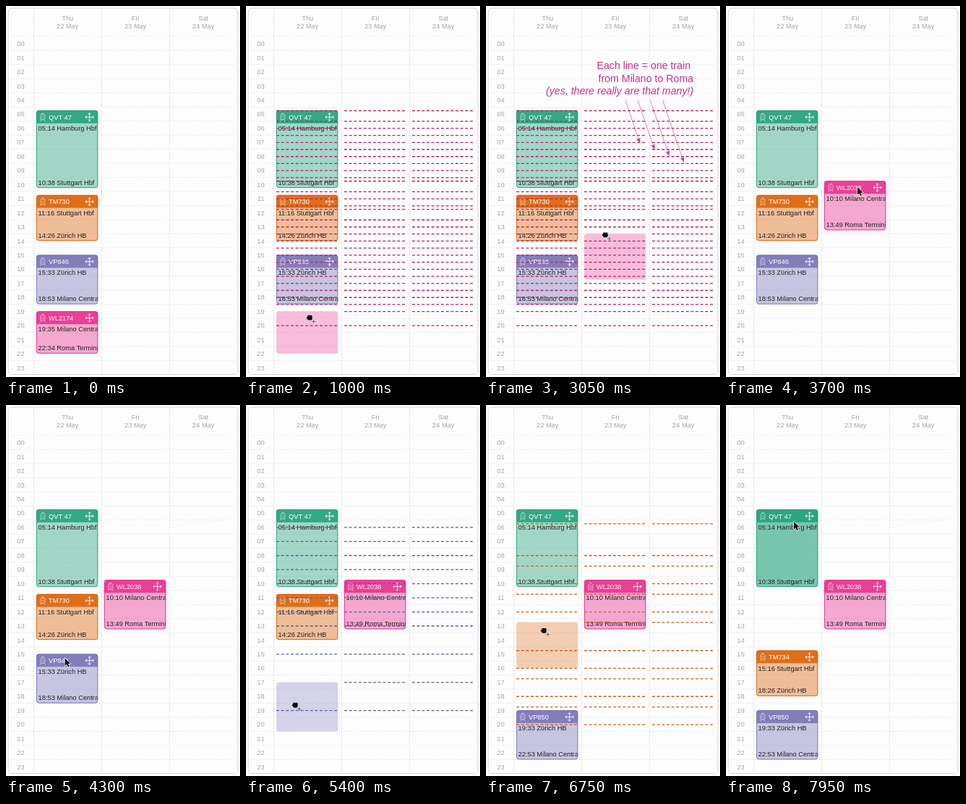
These frames come from a looping animation (324x512 px, 8000 ms). An HTML page with a canvas:

```html
<!DOCTYPE html>
<html lang="en">
<head>
<meta charset="utf-8">
<title>Train timetable planner</title>
<style>
html, body { margin: 0; width: 100%; height: 100%; overflow: hidden; background: #fff; }
canvas { display: block; width: 324px; height: 512px; }
</style>
</head>
<body>
<canvas id="stage"></canvas>
<script>
const W = 324, H = 512, LOOP = 8000;
const FONT = '"Liberation Sans", Arial, sans-serif';
const GREEN = '#1b9e77', ORANGE = '#d95f02', PURPLE = '#7570b3', PINK = '#e7298a';
const GREY = '#a6a6a6', NOTE = '#d0308a';
const BLOCK_W = 85.3, COL_W = 94, LEFT = 38.4, HOUR = 19.45, TOP = 42;
const HINT = 100, LAG = 100;
const FREEZE_AT = 1800, FREEZE_FOR = 950;

const canvas = document.getElementById('stage');
const ctx = canvas.getContext('2d');
const dpr = window.devicePixelRatio || 1;
canvas.width = W * dpr;
canvas.height = H * dpr;

const clamp = (v, a, b) => Math.min(b, Math.max(a, v));
const smooth = p => p * p * (3 - 2 * p);
const easeOut = p => 1 - (1 - p) ** 2;
const quarterY = q => TOP + q * HOUR / 4;
const colX = c => LEFT + 3.6 + c * COL_W;

// Departures repeat at a fixed interval; all positions are quarter hours since midnight.
const every = (step, first, last) =>
  Array.from({ length: (last - first) / step + 1 }, (_, i) => first + i * step);
const ride = (col, q, len, title, from, to) => ({ col, q, len, title, from, to });

// grab: pointer place at the pick; via: points passed while dragging (time, x, y)
const trains = [
  { color: PINK, line: '#b8246c', pick: 800, drop: 2700, grab: [88, 430],
    via: [[1690, 88, 430], [1800, 88, 411], [2100, 165, 316]],
    slots: [21, ...every(2, 24, 40), 41, ...every(2, 44, 48), 49, ...every(2, 52, 78), 82],
    before: ride(0, 78, 12, 'WL2174', '19:35 Milano Centrale', '22:34 Roma Termini'),
    after: ride(1, 41, 14, 'WL2038', '10:10 Milano Centrale', '13:49 Roma Termini') },
  { color: PURPLE, line: '#625da4', pick: 3550, drop: 4800, grab: [74, 357],
    via: [[4450, 68, 414]],
    slots: [...every(4, 26, 54), ...every(8, 62, 78)],
    before: ride(0, 62, 14, 'VP846', '15:33 Zürich HB', '18:53 Milano Centrale'),
    after: ride(0, 78, 14, 'VP850', '19:33 Zürich HB', '22:53 Milano Centrale') },
  { color: ORANGE, line: '#c86420', pick: 5300, drop: 6200, grab: [78, 275],
    via: [[5800, 80, 311]],
    slots: [25, ...every(8, 34, 50), ...every(8, 66, 82), ...every(8, 37, 77)],
    before: ride(0, 45, 13, 'TM730', '11:16 Stuttgart Hbf', '14:26 Zürich HB'),
    after: ride(0, 61, 13, 'TM734', '15:16 Stuttgart Hbf', '18:26 Zürich HB') },
  { color: GREEN, pick: 6900, drop: Infinity, grab: [94, 161],
    before: ride(0, 21, 22, 'QVT 47', '05:14 Hamburg Hbf', '10:38 Stuttgart Hbf') }
];

const grip = train => train.grab[1] - quarterY(train.before.q);

function legs(train) {
  const { pick, drop, grab, via, after } = train;
  if (!after) return [[pick, ...grab]];
  const end = [grab[0] + after.col * COL_W, quarterY(after.q) + grip(train)];
  return [[pick, ...grab], [pick + HINT, ...grab], ...via, [drop - 50, ...end], [drop + 100, ...end]];
}

const path = [[100, 335, 460], ...trains.flatMap(legs)];

function pointer(u) {
  let i = 0;
  while (i < path.length - 2 && path[i + 1][0] <= u) i++;
  const [t0, x0, y0] = path[i], [t1, x1, y1] = path[i + 1];
  const p = easeOut(clamp((u - t0) / (t1 - t0), 0, 1));
  return { x: x0 + (x1 - x0) * p, y: y0 + (y1 - y0) * p };
}

function text(str, x, y, color, size = 9.28, align = 'left', style = '') {
  ctx.font = `${style} ${size}px ${FONT}`;
  ctx.textAlign = align;
  ctx.fillStyle = color;
  ctx.fillText(str, x, y);
}

function stroke(points, color, width, dash = []) {
  ctx.strokeStyle = color;
  ctx.lineWidth = width;
  ctx.setLineDash(dash);
  ctx.beginPath();
  points.forEach(([x, y]) => ctx.lineTo(x, y));
  ctx.stroke();
  ctx.setLineDash([]);
}

function roundRect(x, y, w, h, r) {
  ctx.beginPath();
  ctx.roundRect(x, y, w, h, r);
}

function outline(x, y, w, h, r, color, width) {
  roundRect(x, y, w, h, r);
  ctx.strokeStyle = color;
  ctx.lineWidth = width;
  ctx.stroke();
}

function drawGrid() {
  ctx.fillStyle = '#fff';
  ctx.fillRect(0, 0, W, H);
  roundRect(3, 3, 318, 505.5, 5);
  ctx.fillStyle = '#fdfdfd';
  ctx.fill();
  for (let h = 0; h < 24; h++) {
    const y = TOP + h * HOUR;
    stroke([[3.5, y], [320.5, y]], '#dcdcdc', 0.8, [1.3, 2]);
    text(String(h).padStart(2, '0'), 20.5, y + 13.2, GREY, 9.28, 'center');
  }
  ['Thu', 'Fri', 'Sat'].forEach((day, i) => {
    const x = LEFT + i * COL_W;
    stroke([[x, 3.5], [x, 508]], '#c8c8c8', 0.8, [1.3, 2]);
    text(day, x + 46.8, 20.4, GREY, 9.28, 'center');
    text(`${22 + i} May`, x + 46.8, 31.4, GREY, 9.28, 'center');
  });
  outline(3, 3, 318, 505.5, 5, '#d2d2d2', 0.9);
}

function drawTrainIcon(x, y) {
  const white = 'rgba(255,255,255,.7)';
  outline(x + 0.9, y + 1.6, 6, 7.2, 1.5, white, 0.75);
  stroke([[x + 2.2, y + 0.2], [x + 5.6, y + 0.2]], white, 0.75);
  stroke([[x + 2.4, y + 4.8], [x + 5.4, y + 4.8]], white, 0.75);
  stroke([[x + 2.4, y + 7], [x + 5.4, y + 7]], white, 0.75, [1, 1]);
  stroke([[x + 2, y + 8.8], [x + 0.6, y + 11]], white, 0.75);
  stroke([[x + 5.8, y + 8.8], [x + 7.2, y + 11]], white, 0.75);
}

function drawMoveIcon(cx, cy) {
  ctx.save();
  ctx.translate(cx, cy);
  for (let i = 0; i < 4; i++) {
    stroke([[0, 0], [0, -5.6]], '#fff', 0.9);
    stroke([[-1.9, -3.8], [0, -5.7], [1.9, -3.8]], '#fff', 0.9);
    ctx.rotate(Math.PI / 2);
  }
  ctx.restore();
}

function drawBlock(r, color) {
  const x = colX(r.col), y = quarterY(r.q), h = r.len * HOUR / 4;
  ctx.save();
  roundRect(x, y, BLOCK_W, h, 3.5);
  ctx.clip();
  ctx.fillStyle = color;
  ctx.globalAlpha = 0.4;
  ctx.fillRect(x, y, BLOCK_W, h);
  ctx.globalAlpha = 0.82;
  ctx.fillRect(x, y, BLOCK_W, 17.8);
  ctx.globalAlpha = 1;
  text(r.title, x + 17, y + 12.6, '#fff');
  drawTrainIcon(x + 5, y + 4);
  drawMoveIcon(x + 73.6, y + 9.2);
  text(r.from, x + 2.6, y + 28, '#222');
  text(r.to, x + 2.6, y + h - 4.4, '#222');
  ctx.restore();
  outline(x + 0.4, y + 0.4, BLOCK_W - 0.8, h - 0.8, 3.5, color, 0.9);
}

function drawGhost(g, color) {
  ctx.globalAlpha = 0.3;
  ctx.fillStyle = color;
  roundRect(colX(g.col), quarterY(g.q), BLOCK_W, g.len * HOUR / 4, 3.5);
  ctx.fill();
  ctx.globalAlpha = 1;
}

function drawSlots(train, ghost) {
  for (const q of train.slots) {
    for (let col = 0; col < 3; col++) {
      if (col === ghost.col && q === ghost.q) continue;
      const x = colX(col), y = quarterY(q) + 0.4;
      stroke([[x, y], [x + BLOCK_W, y]], train.line, 1.3, [4, 2.67]);
    }
  }
}

// The ghost snaps to the departure nearest to the slightly delayed pointer.
function snap(train, u) {
  const p = pointer(Math.max(train.pick, u - LAG));
  const dist = q => Math.abs(quarterY(q) - p.y + grip(train));
  const q = train.slots.reduce((a, b) => dist(b) < dist(a) ? b : a);
  const col = clamp(Math.floor((p.x - LEFT) / COL_W), 0, 2);
  const { before, after } = train;
  const len = q === before.q ? before.len : q === after.q ? after.len
    : Math.floor((before.len + after.len) / 2);
  return { col, q, len };
}

function drawNoteArrow(x0, y0, x1, y1) {
  ctx.save();
  ctx.translate(x1, y1);
  ctx.rotate(Math.atan2(y1 - y0, x1 - x0));
  stroke([[-Math.hypot(x1 - x0, y1 - y0), 0], [-5, 0]], NOTE, 0.55);
  ctx.beginPath();
  [[0.5, 0], [-7, -2.8], [-5.6, 0], [-7, 2.8]].forEach(p => ctx.lineTo(...p));
  ctx.fillStyle = NOTE;
  ctx.fill();
  ctx.restore();
}

function drawNote(alpha) {
  if (alpha <= 0) return;
  ctx.globalAlpha = alpha;
  text('Each line = one train', 283.2, 87, NOTE, 14.2, 'right');
  text('from Milano to Roma', 287.2, 104.6, NOTE, 14.2, 'right');
  text('(yes, there really are that many!)', 287.2, 122.2, NOTE, 14.2, 'right', 'italic');
  for (let i = 0; i < 4; i++) {
    drawNoteArrow(193 + 17.2 * i, 130, 213 + 20.3 * i, 189 + 8.8 * i);
  }
  ctx.globalAlpha = 1;
}

function drawArrow({ x, y }) {
  ctx.save();
  ctx.translate(x, y);
  ctx.beginPath();
  [[0, 0], [0, 10.5], [2.5, 8.3], [4.2, 12], [6, 11.2], [4.4, 7.6], [7.6, 7.4]]
    .forEach(p => ctx.lineTo(...p));
  ctx.closePath();
  ctx.strokeStyle = '#fff';
  ctx.lineWidth = 1.2;
  ctx.stroke();
  ctx.fillStyle = '#111';
  ctx.fill();
  ctx.restore();
}

function drawFist({ x, y }) {
  ctx.save();
  ctx.translate(x, y);
  for (const [color, width] of [['#fff', 2], ['#444', 0.9]]) {
    stroke([[3, 5.4], [8.4, 5.4]], color, width);
    stroke([[5.7, 2.7], [5.7, 8.1]], color, width);
  }
  ctx.fillStyle = '#0a0a0a';
  roundRect(-3, -2.6, 6.6, 6.2, 2.2);
  ctx.fill();
  for (let i = 0; i < 4; i++) {
    ctx.beginPath();
    ctx.arc(-2 + i * 1.5, -2.3, 1, 0, 7);
    ctx.fill();
  }
  ctx.beginPath();
  ctx.arc(-2.9, 0.2, 1.3, 0, 7);
  ctx.fill();
  ctx.restore();
}

function draw(t) {
  // The scene pauses while the note is read.
  const u = t - clamp(t - FREEZE_AT, 0, FREEZE_FOR);
  let active = null;

  ctx.setTransform(dpr, 0, 0, dpr, 0, 0);
  drawGrid();
  for (const train of trains) {
    const held = u >= train.pick && u < train.drop;
    if (held && train.slots && u >= train.pick + HINT) {
      active = train;
      continue;
    }
    if (held) drawGhost(train.before, train.color);
    drawBlock(u >= train.drop ? train.after : train.before, train.color);
  }
  if (active) {
    const ghost = snap(active, u);
    drawGhost(ghost, active.color);
    drawSlots(active, ghost);
  }
  if (u < trains[0].drop) drawNote(smooth(clamp((t - 1200) / 600, 0, 1)));
  if (u >= path[0][0]) (active ? drawFist : drawArrow)(pointer(u));
}

const start = performance.now();
function tick() {
  draw((performance.now() - start) % LOOP);
  requestAnimationFrame(tick);
}
tick();
</script>
</body>
</html>
```
